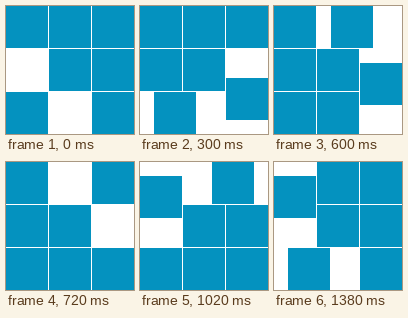
Write an HTML page that moves like this. It is 128x128 px and loops after 1440 ms.

```html
<!DOCTYPE html>
<html lang="en">
<head>
<meta charset="utf-8">
<title>Sliding tiles</title>
<style>
html, body { margin: 0; width: 100%; height: 100%; overflow: hidden; background: #fff; }
svg { display: block; width: 100vw; height: 100vh; }
</style>
</head>
<body>
<svg id="stage" viewBox="0 0 128 128" fill="#0492bf" shape-rendering="crispEdges"></svg>
<script>
const LOOP = 1440, TICK = 60, STEPS = 3, SIZE = 42, PITCH = 43;
// Outer cells, clockwise from the top left, as [column, row]
const ring = [[0, 0], [1, 0], [2, 0], [2, 1], [2, 2], [1, 2], [0, 2], [0, 1]];
const stage = document.getElementById("stage");

function addTile() {
  const tile = document.createElementNS("http://www.w3.org/2000/svg", "rect");
  tile.setAttribute("width", SIZE);
  tile.setAttribute("height", SIZE);
  return stage.appendChild(tile);
}

function place(tile, col, row) {
  tile.setAttribute("x", Math.round(col * PITCH));
  tile.setAttribute("y", Math.round(row * PITCH));
}

const wrap = i => (i + 8) % 8;
const tiles = Array.from({ length: 6 }, addTile);
place(addTile(), 1, 1);

function draw(time) {
  const tick = Math.floor((time % LOOP) / TICK);
  const move = Math.floor(tick / STEPS);
  const part = (tick % STEPS) / STEPS;
  // Two gaps run anticlockwise; the tile behind each gap slides into it
  const gaps = [wrap(7 - move), wrap(5 - move)];
  let n = 0;
  ring.forEach(([col, row], i) => {
    if (gaps.includes(i)) return;
    const next = wrap(i + 1);
    const k = gaps.includes(next) ? part : 0;
    place(tiles[n++], col + (ring[next][0] - col) * k, row + (ring[next][1] - row) * k);
  });
}

function loop() {
  draw(performance.now());
  requestAnimationFrame(loop);
}
loop();
</script>
</body>
</html>
```
